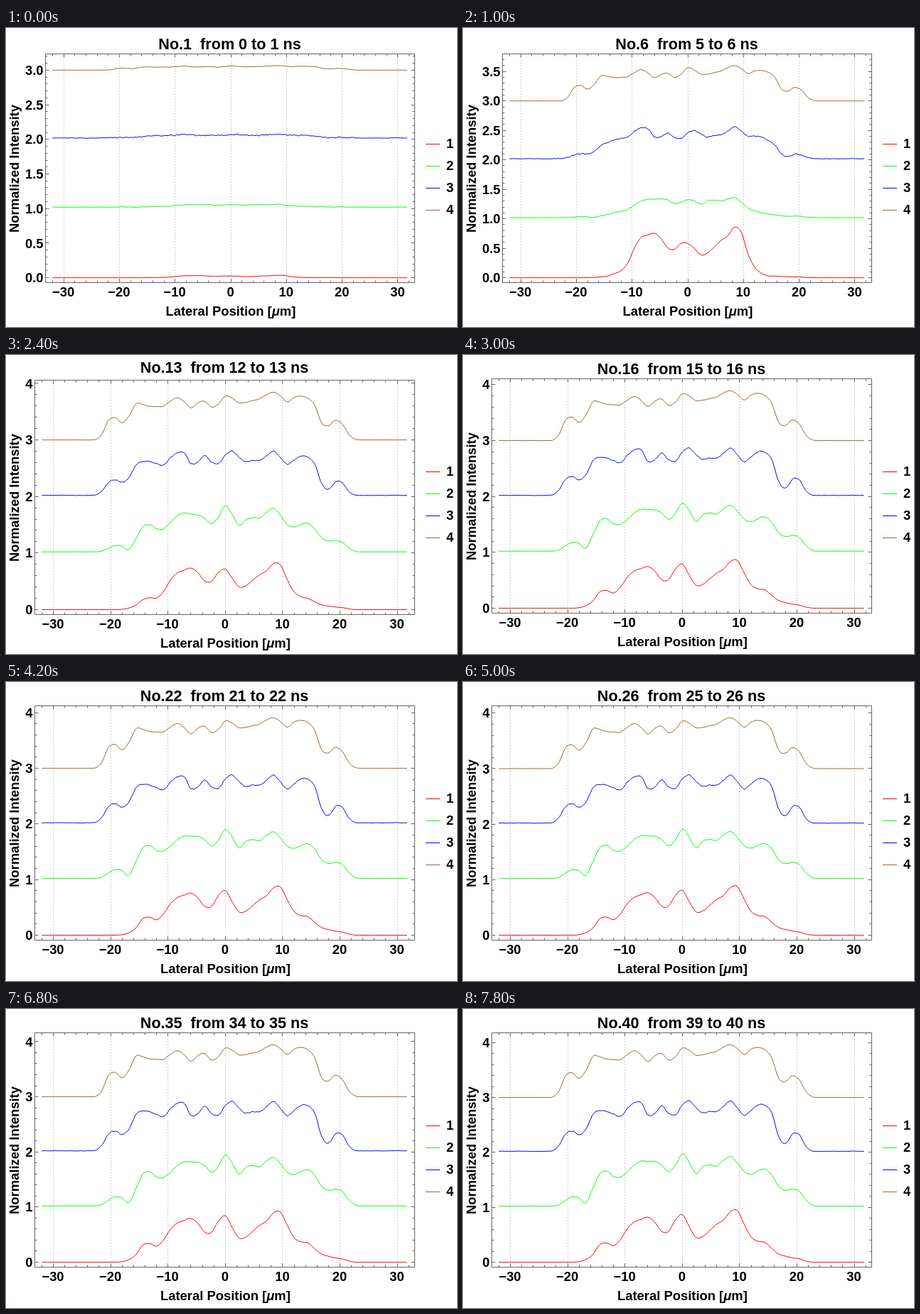
An HTML page with a canvas that plays this animation: 634x421 px, repeating every 8 s.

```html
<!DOCTYPE html>
<html lang="en">
<head>
<meta charset="utf-8">
<title>Lateral intensity profiles</title>
<style>
html, body { margin: 0; width: 100%; height: 100%; overflow: hidden; background: #fff; }
canvas { display: block; }
</style>
</head>
<body>
<canvas id="stage" width="634" height="421"></canvas>
<script>
const ctx = document.getElementById('stage').getContext('2d');
const STEP = 200, COUNT = 40;
const FONT = '"Liberation Sans", Arial, sans-serif';
const SMALL = 18.4, LARGE = 21.6;

// Final heights in hundredths, evenly spaced from FIRST.
const FIRST = -22.8, SPACING = 1.2;
const red = [0,0,0,0,1,5,14,32,35,30,41,61,73,78,82,73,56,56,77,87,65,45,47,58,69,77,92,94,69,46,38,36,25,15,11,8,6,2,0];
const green = [2,4,12,19,17,8,34,61,66,56,55,64,77,84,84,83,77,65,76,97,82,61,74,77,75,86,92,81,65,60,66,69,59,38,31,33,29,13,3];
const blue = [2,11,33,39,32,42,69,76,74,70,65,80,90,91,68,71,85,71,68,86,94,81,72,75,74,84,94,81,67,77,86,86,72,29,16,33,33,10,2];
const brown = [0,10,39,45,35,49,75,74,70,69,69,78,85,78,65,76,80,68,74,90,86,77,78,81,84,92,96,89,78,88,91,87,72,35,29,40,32,10,1];

// Growth: "early" and "middle" give the gain at each distance in ZONES.
const ZONES = [0, 3, 9, 11, 14, 20];
const TIMES = [1, 6, 10, 16, 30, 40];
const series = [];
function add(color, shape, base, noise, start, rise, early, middle, late) {
  const gains = [early.map(g => g * start), early, middle, ...late.map(g => ZONES.map(() => g))];
  series.push({ color, shape, base, noise, rise, gains, offset: series.length });
}
add('#f00', red, 0, .001, .042, .7, [.67,.9,.94,.55,.08,.2], [.73,.9,.86,.6,.18,.25], [.91,.94,1]);
add('#0f0', green, 2, .007, .12, 1.2, [.32,.4,.37,.25,.09,.08], [.81,.65,.81,.61,.6,.34], [.91,.95,1]);
add('#00f', blue, 2, .012, .1, .95, [.52,.52,.6,.58,.38,.21], [.77,.78,.78,.77,.7,.57], [.92,.95,1]);
add('#963', brown, 0, .004, .11, .8, [.63,.58,.63,.59,.56,.58], [.8,.77,.835,.79,.76,.82], [.93,.965,1]);

const random = k => {
  const v = Math.sin(k * 12.9898) * 43758.5453;
  return (v - Math.floor(v)) * 2 - 1;
};

const mix = (a, b, u) => a + (b - a) * u;

// Index of the interval of list that holds v, and the place within it.
function locate(list, v) {
  let k = 0;
  while (k < list.length - 2 && v >= list[k + 1]) k++;
  return [k, Math.min(1, (v - list[k]) / (list[k + 1] - list[k]))];
}

function gain(s, x, n) {
  let [k, u] = locate(TIMES, n);
  if (k === 0) u = Math.pow(u, s.rise);
  const [z, w] = locate(ZONES, Math.abs(x));
  const at = row => mix(row[z], row[z + 1], w);
  return mix(at(s.gains[k]), at(s.gains[k + 1]), u);
}

function heights(s, n) {
  return s.shape.map((v, i) => (v - s.base) / 100 * gain(s, FIRST + i * SPACING, n));
}

// Smooth cubic through the heights, with a little noise.
function curve(s, n) {
  const y = heights(s, n), at = i => y[i] || 0;
  const points = [];
  for (let i = 0; i < 200; i++) {
    const x = -32 + i * .32;
    const p = (x - FIRST) / SPACING, k = Math.floor(p), t = p - k;
    const [a, b, c, d] = [at(k - 1), at(k), at(k + 1), at(k + 2)];
    const v = b + t / 2 * (c - a + t * (2 * a - 5 * b + 4 * c - d + t * (3 * (b - c) + d - a)));
    const amp = s.noise * (Math.abs(x) < 22 ? 1 : .4);
    const wobble = random(i + s.offset * 300 + 1) * .7 + random(i + n * 977 + s.offset * 300) * .3;
    points.push([x, s.offset + s.base / 100 + Math.max(0, v) + amp * wobble]);
  }
  return points;
}

function text(str, x, y, size, align = 'center', style = '') {
  ctx.font = `${style} bold ${size}px ${FONT}`;
  ctx.textAlign = align;
  ctx.fillText(str, x, y + size * .358);
  return ctx.measureText(str).width;
}

function line(x1, y1, x2, y2) {
  ctx.beginPath();
  ctx.moveTo(x1, y1);
  ctx.lineTo(x2, y2);
  ctx.stroke();
}

const crisp = v => Math.floor(v) + .5;

function layout(n) {
  const whole = n >= 10;
  const peak = 3 + Math.max(...heights(series[3], n));
  const high = peak * 1.055, low = -peak * .0229;
  const box = whole
    ? { left: 40.5, top: 33.5, bottom: 363.5, x0: 308.3, unit: 8.06, title: 18.8, legend: 164.5, major: 1, minor: .2 }
    : { left: 55.5, top: 36.5, bottom: 358.5, x0: 316, unit: 7.833, title: 22, legend: 163.5, major: .5, minor: .1 };
  box.right = 574.5;
  box.scale = (box.bottom - box.top) / (high - low);
  // A label close to the upper edge pushes title and plot apart.
  const gap = (high - Math.floor(high / box.major + .001) * box.major) * box.scale;
  const push = Math.max(0, 8 - gap) / 2;
  const shift = Math.round(push + .4 * (push > 0));
  box.title -= push;
  box.top += shift;
  box.bottom += shift;
  if (push > 2 && whole) box.legend = 163.5;
  box.high = high;
  box.px = v => box.x0 + v * box.unit;
  box.py = v => box.bottom - (v - low) * box.scale;
  return box;
}

function axes(b, n) {
  ctx.lineWidth = 1;
  ctx.strokeStyle = '#999';
  ctx.setLineDash([1, 3]);
  for (let v = -30; v <= 30; v += 10) line(crisp(b.px(v)), b.top, crisp(b.px(v)), b.bottom);
  ctx.setLineDash([]);

  ctx.strokeStyle = '#666';
  ctx.strokeRect(b.left, b.top, b.right - b.left, b.bottom - b.top);
  ctx.fillStyle = '#000';
  for (let v = -32; v <= 32; v += 2) {
    const x = crisp(b.px(v)), major = v % 10 === 0, len = major ? 5 : 3;
    line(x, b.bottom, x, b.bottom - len);
    line(x, b.top, x, b.top + len);
    if (major) text(String(v).replace('-', '\u2212'), b.px(v) - .5, b.bottom + 13, SMALL);
  }
  const per = Math.round(b.major / b.minor);
  for (let i = 0; i * b.minor <= b.high + .003; i++) {
    const v = i * b.minor, y = crisp(b.py(v)), major = i % per === 0, len = major ? 5 : 3;
    line(b.left, y, b.left + len, y);
    line(b.right, y, b.right - len, y);
    if (major) text(v.toFixed(b.major < 1 ? 1 : 0), b.left - 3, b.py(v), SMALL, 'right');
  }

  const mid = (b.left + b.right) / 2;
  text(`No.${n}  from ${n - 1} to ${n} ns`, mid - .5, b.title, LARGE);
  let x = mid - 90.5;
  const y = b.bottom + 39.5;
  x += text('Lateral Position [', x, y, SMALL, 'left');
  x += text('\u03bc', x, y, SMALL, 'left', 'italic');
  text('m]', x, y, SMALL, 'left');

  ctx.save();
  ctx.translate(11.5, (b.top + b.bottom) / 2 + .5);
  ctx.rotate(-Math.PI / 2);
  text('Normalized Intensity', 0, 0, SMALL);
  ctx.restore();
}

function draw(n) {
  ctx.fillStyle = '#fff';
  ctx.fillRect(0, 0, 634, 421);
  const b = layout(n);
  axes(b, n);
  ctx.lineJoin = 'round';
  series.forEach((s, i) => {
    ctx.strokeStyle = s.color;
    ctx.beginPath();
    for (const [x, y] of curve(s, n)) ctx.lineTo(b.px(x), b.py(y));
    ctx.stroke();
    const y = b.legend + i * 31;
    line(590, y, 610, y);
    text(String(i + 1), 624, y - 1, SMALL);
  });
}

let shown = 0;
function tick(now) {
  const n = Math.floor(now / STEP) % COUNT + 1;
  if (n !== shown) draw(shown = n);
  requestAnimationFrame(tick);
}
draw(1);
requestAnimationFrame(tick);
</script>
</body>
</html>
```
